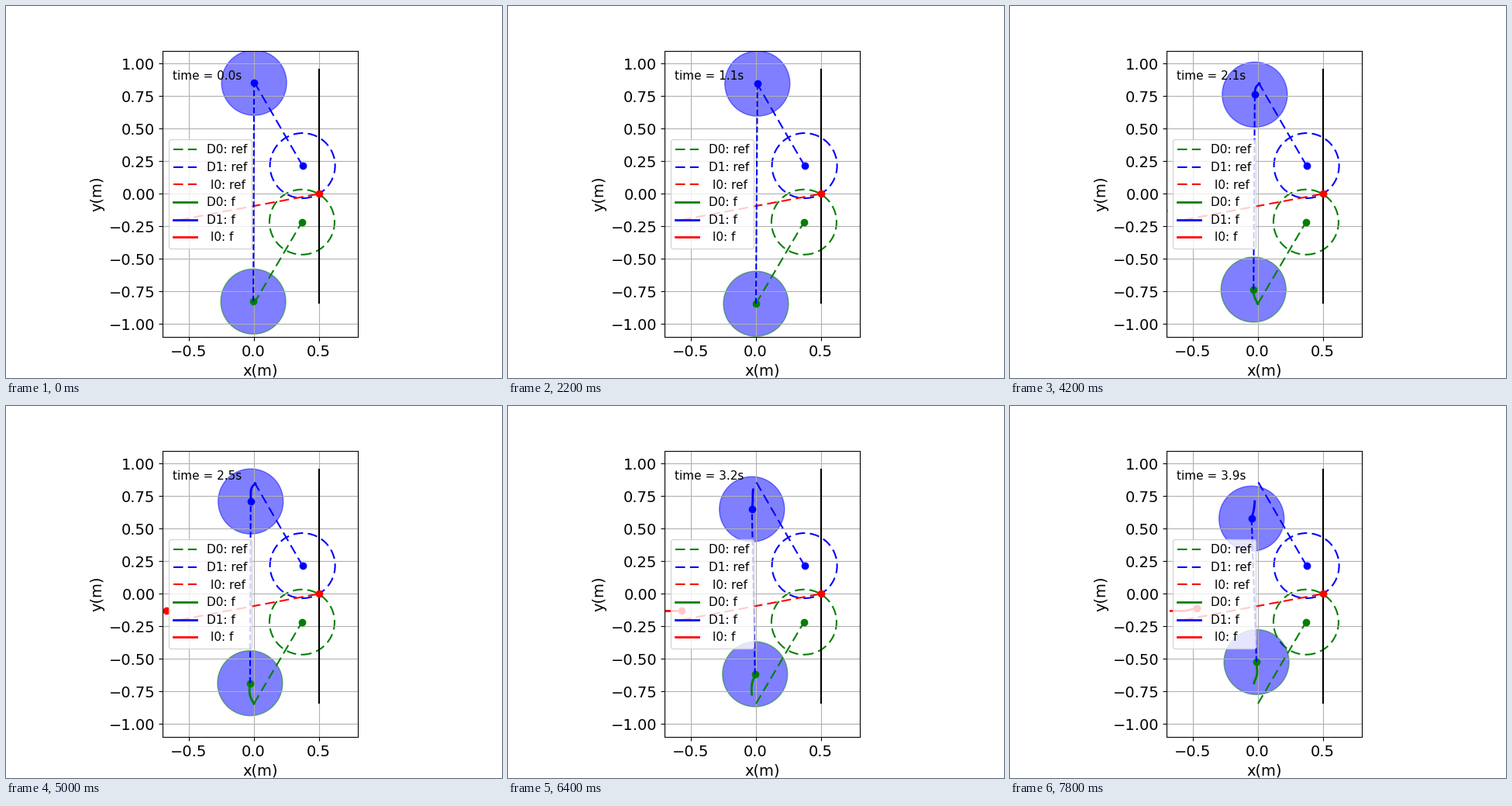
A matplotlib script that plays this animation: 640 px wide and 480 px high, repeating every 8000 ms.

```python
import numpy as np
import matplotlib.pyplot as plt
from matplotlib.animation import FuncAnimation
from matplotlib.patches import Circle

FRAMES, STEP = 40, 0.1      # frame count, simulated seconds per frame
TRAIL = 14                  # trail length in steps
RADIUS = 0.25
DASH = (0, (6, 3))
TARGET = (0.5, 0.0)
times = np.arange(FRAMES) * STEP

# defenders hover, then close in: positions at a few shared times
KEY_T = np.array([0, .5, 1.1, 1.7, 2.5, 3.2, 3.9])
D0_X = [-.003, -.006, .002, -.027, -.028, -.005, -.009]
D0_Y = [-.827, -.837, -.844, -.785, -.686, -.617, -.524]
D1_X = [.003, .012, .013, -.017, -.023, -.029, -.047]
D1_Y = [.853, .841, .847, .811, .71, .65, .578]


def smooth(values):
    """Cubic Hermite curve through values at KEY_T, sampled at times."""
    p = np.array(values)
    slope = np.gradient(p, KEY_T)
    i = np.clip(np.searchsorted(KEY_T, times, side="right") - 1,
                0, len(KEY_T) - 2)
    h = KEY_T[i + 1] - KEY_T[i]
    u = (times - KEY_T[i]) / h
    return ((1 + 2 * u) * (1 - u) ** 2 * p[i]
            + u * (1 - u) ** 2 * h * slope[i]
            + u * u * (3 - 2 * u) * p[i + 1]
            + u * u * (u - 1) * h * slope[i + 1])


def intruder():
    """Steady flight to the right with a late eased climb."""
    u = np.clip((times - 3.2) / 0.7, 0, 1)
    return np.column_stack([-1.02 + 0.141 * times,
                            -0.131 + 0.018 * u * u * (3 - 2 * u)])


paths = [np.column_stack([smooth(D0_X), smooth(D0_Y)]),
         np.column_stack([smooth(D1_X), smooth(D1_Y)]),
         intruder()]
names, colors = ("D0", "D1", " I0"), ("g", "b", "r")
refs = [((.002, -.843), (.371, -.2165)),
        ((.005, .857), (.375, .2165)),
        ((-.57, -.2), TARGET)]

fig, ax = plt.subplots(figsize=(6.4, 4.8), dpi=100)
ax.set_aspect("equal")
ax.set_xlim(-0.7, 0.8)
ax.set_ylim(-1.1, 1.1)
ax.set_xticks([-0.5, 0, 0.5])
ax.set_yticks(np.arange(-1, 1.01, 0.25))
ax.tick_params(labelsize=14)
ax.set_xlabel("x(m)", fontsize=14)
ax.set_ylabel("y(m)", fontsize=14)
ax.grid(True)

ax.plot([0.5, 0.5], [-0.835, 0.957], "k", lw=1.5)
for (start, end), name, c in zip(refs, names, colors):
    ax.plot(*zip(start, end), color=c, lw=1.5, ls=DASH, label=f"{name}: ref")
    ax.plot(*end, "o", color=c)
for (_, goal), c in zip(refs[:2], colors):
    ax.add_patch(Circle(goal, RADIUS, fill=False, ec=c, lw=1.5, ls=DASH))

trails = [ax.plot([], [], color=c, lw=2, label=f"{name}: f")[0]
          for name, c in zip(names, colors)]
dots = [ax.plot([], [], "o", color=c)[0] for c in colors]
link, = ax.plot([], [], "b--", lw=1.5)
discs = [ax.add_patch(Circle((0, 0), RADIUS, fc="b", ec=c, alpha=0.5))
         for c in colors[:2]]
clock = ax.text(0.05, 0.9, "", transform=ax.transAxes, fontsize=11)
ax.legend(loc="center left", fontsize=11)


def update(n):
    for path, trail, dot in zip(paths, trails, dots):
        trail.set_data(*path[max(0, n - TRAIL):n + 1].T)
        dot.set_data(*path[n:n + 1].T)
    for path, disc in zip(paths, discs):
        disc.center = path[n]
    link.set_data(*np.array([paths[0][n], paths[1][n]]).T)
    clock.set_text(f"time = {n * STEP:.1f}s")
    return [*trails, *dots, *discs, link, clock]


anim = FuncAnimation(fig, update, frames=FRAMES, interval=200,
                     repeat=True, repeat_delay=0)
plt.show()
```
